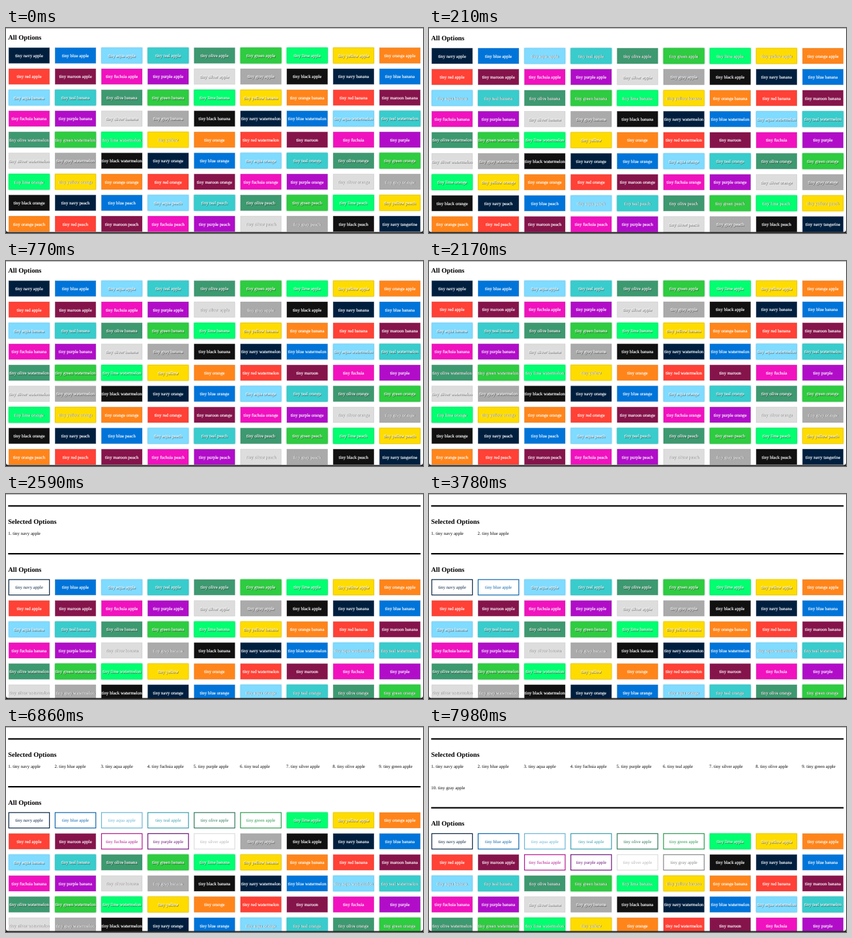
Animation, 640 px wide and 316 px high, one loop 8 s. Source, as an HTML page:

```html
<!DOCTYPE html>
<html lang="en">
<head>
<meta charset="utf-8">
<title>All Options</title>
<style>
  html, body { margin: 0; width: 100%; height: 100%; overflow: hidden; background: #fff; }
  svg { display: block; width: 100%; height: 100%; }
  text {
    font: 6.93px "Liberation Serif", "Times New Roman", serif;
    fill: #000;
    text-rendering: geometricPrecision;
  }
  .heading { font-size: 10.4px; font-weight: bold; }
  .button text { fill: #fff; stroke: #fff; stroke-width: .15px; text-anchor: middle; }
  .button rect { stroke-width: .8px; stroke-opacity: .45; }
  .bright rect { filter: drop-shadow(.4px .5px 1.3px var(--glow)); }
  .pale text { text-shadow: .6px .7px .6px rgba(0, 0, 0, .45); }
  .selected text { stroke: none; }
  .selected rect { stroke-width: 1.2px; stroke-opacity: 1; }
</style>
</head>
<body>
<svg id="stage" viewBox="0 0 640 316"></svg>
<script>
const LOOP = 8000;
const COLUMNS = 9, ROWS = 9;
const PITCH_X = 71.13, PITCH_Y = 32.44;
const LIST_HEIGHT = 101.4;

// name: [fill, ink when selected]
const COLORS = {
  navy: ['#001f3f', '#001f3f'], blue: ['#0074d9', '#0864ac'],
  aqua: ['#7fdbff', '#66b4d4'], teal: ['#39cccc', '#369eae'],
  olive: ['#3d9970', '#2c7757'], green: ['#2ecc40', '#28994c'],
  lime: ['#01ff70', '#00b850'], yellow: ['#ffdc00', '#b79e00'],
  orange: ['#ff851b', '#c46210'], red: ['#ff4136', '#c42b22'],
  maroon: ['#85144b', '#85144b'], fuchsia: ['#f012be', '#b3128f'],
  purple: ['#b10dc9', '#6c117c'], silver: ['#dddddd', '#b4b4b4'],
  gray: ['#aaaaaa', '#858585'], black: ['#111111', '#111111']
};
const FRUITS = ['apple', 'banana', 'watermelon', 'orange', 'peach', 'tangerine'];
const PICKS = [
  ['navy', 2590], ['blue', 3640], ['aqua', 4130], ['fuchsia', 4550], ['purple', 4970],
  ['teal', 5320], ['silver', 5810], ['olive', 6370], ['green', 6860], ['gray', 7280]
];
const BRIGHT = ['aqua', 'teal', 'green', 'lime', 'yellow'];
const PALE = [...BRIGHT, 'silver', 'gray', 'olive'];
const TOO_WIDE = /(yellow|orange|maroon|fuchsia|purple) watermelon/;

const stage = document.getElementById('stage');

function add(parent, tag, attrs = {}, content = '') {
  const node = document.createElementNS('http://www.w3.org/2000/svg', tag);
  for (const key in attrs) node.setAttribute(key, attrs[key]);
  node.textContent = content;
  return parent.appendChild(node);
}

function addRule(parent, y) {
  return add(parent, 'rect', { x: 3.3, y, width: 633, height: 2.2 });
}

function addButton(parent, index) {
  const names = Object.keys(COLORS);
  const color = names[index % names.length];
  const label = `tiny ${color} ${FRUITS[Math.floor(index / names.length)]}`;
  const x = 4.3 + (index % COLUMNS) * PITCH_X;
  const y = 30.5 + Math.floor(index / COLUMNS) * PITCH_Y;
  const classes = ['button'];
  if (BRIGHT.includes(color)) classes.push('bright');
  if (PALE.includes(color)) classes.push('pale');
  const group = add(parent, 'g', { style: `--glow: ${COLORS[color][0]}` });
  const box = add(group, 'rect', { x, y, width: 62.4, height: 23.8 });
  // Labels that wrap only show their first line.
  const visible = TOO_WIDE.test(label) ? `tiny ${color}` : label;
  const text = add(group, 'text', { x: x + 31.2, y: y + 14.5 }, visible);
  return { group, box, text, color, classes: classes.join(' ') };
}

function paintButton({ group, box, text, color, classes }, selected) {
  const [fill, ink] = COLORS[color];
  group.setAttribute('class', selected ? 'button selected' : classes);
  box.setAttribute('fill', selected ? '#fff' : fill);
  box.setAttribute('stroke', selected && color === 'silver' ? fill : ink);
  text.style.fill = selected ? ink : '';
}

add(stage, 'rect', { width: 640, height: 316, fill: '#fff' });
const page = add(stage, 'g');

const list = add(page, 'g');
addRule(list, 17.3);
add(list, 'text', { class: 'heading', x: 3.3, y: 45.8 }, 'Selected Options');
const entries = PICKS.map(([color], i) => add(list, 'text', {
  x: 3.3 + (i % COLUMNS) * PITCH_X,
  y: 63.2 + Math.floor(i / COLUMNS) * PITCH_Y
}, `${i + 1}. tiny ${color} apple`));
const lowerRule = addRule(list, 91);

const options = add(page, 'g');
add(options, 'text', { class: 'heading', x: 3.3, y: 18.4 }, 'All Options');
const buttons = Array.from({ length: COLUMNS * ROWS }, (_, i) => addButton(options, i));

// Window edges
add(stage, 'rect', { width: 640, height: 1, fill: '#aaa' });
add(stage, 'path', { d: 'M0 311Q0 314.6 4 314.6H636Q640 314.6 640 311V316H0Z', fill: '#222' });

let shownCount = -1;

function showPicks(count) {
  if (count === shownCount) return;
  shownCount = count;
  const extraRows = Math.max(0, Math.ceil(count / COLUMNS) - 1) * PITCH_Y;
  list.setAttribute('visibility', count ? 'visible' : 'hidden');
  entries.forEach((entry, i) => entry.setAttribute('display', i < count ? 'inline' : 'none'));
  lowerRule.setAttribute('y', 91 + extraRows);
  options.setAttribute('transform', `translate(0 ${count ? LIST_HEIGHT + extraRows : 0})`);
  const chosen = PICKS.slice(0, count).map(([color]) => color);
  buttons.forEach((button, i) => paintButton(button, i < 16 && chosen.includes(button.color)));
}

function render(time) {
  showPicks(PICKS.filter(([, start]) => time >= start).length);
  const bounce = time < 840 ? 1.3 * Math.sin(Math.PI * time / 840) ** 2 : 0;
  page.setAttribute('transform', `translate(0 ${bounce.toFixed(2)})`);
}

const start = performance.now();
function tick() {
  render((performance.now() - start) % LOOP);
  requestAnimationFrame(tick);
}
tick();
</script>
</body>
</html>
```
